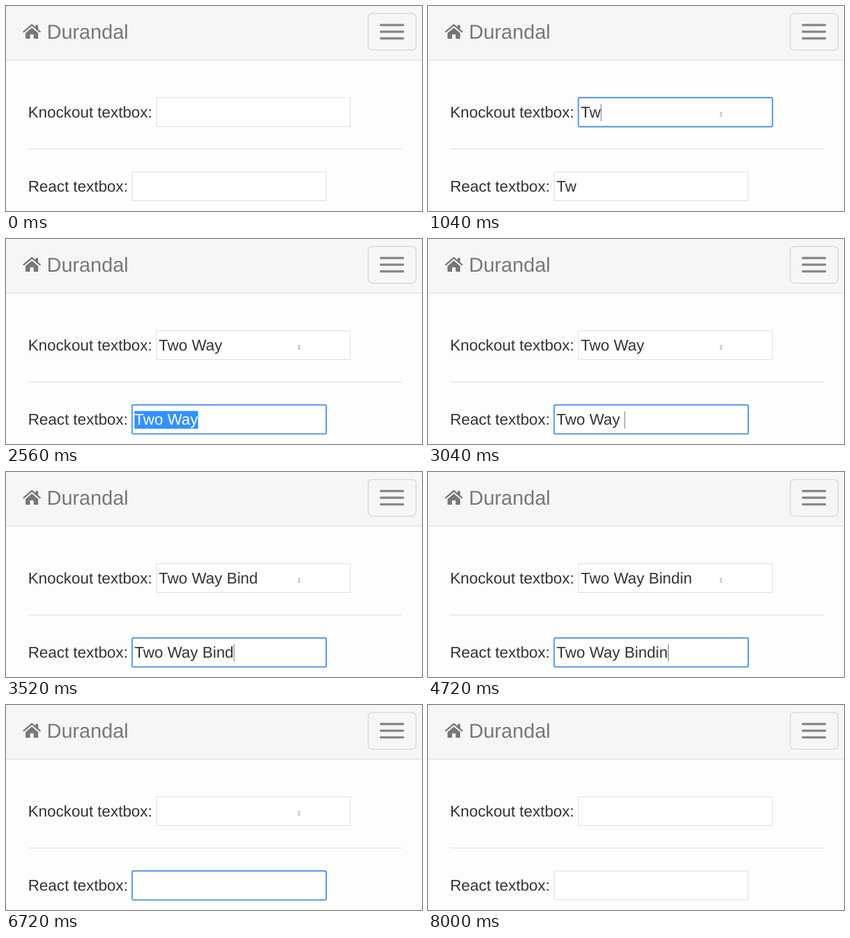
Write an HTML page that moves like this. It is 621 px wide and 307 px high and loops after 8080 ms.

```html
<!DOCTYPE html>
<html lang="en">
<head>
<meta charset="utf-8">
<title>Two-way binding</title>
<style>
  html, body { margin: 0; width: 100%; height: 100%; overflow: hidden; background: #fdfdfd; }
  svg { display: block; width: 100%; height: 100%; }
  text {
    font: 23.3px "Liberation Sans", Arial, sans-serif;
    fill: #333; white-space: pre; text-rendering: geometricPrecision;
  }
  .brand { font-size: 30px; fill: #777; }
</style>
</head>
<body>
<svg id="stage" viewBox="0 0 621 307">
  <rect width="621" height="307" fill="#fdfdfd"/>
  <rect width="621" height="81" fill="#f6f6f6"/>
  <path d="M0 81H621" stroke="#e4e4e4" stroke-width="1.6"/>
  <g fill="#777">
    <path d="M44 28.5h4v8l-4-3.4z"/>
    <path d="M29.2 40.4 38.6 32.5 48 40.4V49h-6.7v-6.6h-5.4V49h-6.7z"/>
    <path d="M25.8 39.2 38.6 28.4 51.4 39.2" fill="none" stroke="#777" stroke-width="2.4"/>
  </g>
  <text class="brand" x="61" y="49">Durandal</text>
  <rect x="540.7" y="11.2" width="71.5" height="55" rx="6.5" fill="none" stroke="#dadada" stroke-width="1.6"/>
  <path d="M559.5 28.5H592.7M559.5 38.5H592.7M559.5 48.5H592.7" stroke="#888" stroke-width="3.3" stroke-linecap="round"/>
  <path d="M33 214.3H591" stroke="#e6e6e6" stroke-width="1.5"/>
  <text x="33" y="167">Knockout textbox:</text>
  <text x="33" y="278.4">React textbox:</text>
</svg>
<script>
const LOOP = 8080, PHRASE = 'Two Way Binding';
const stage = document.getElementById('stage');

// Times of each keystroke, in order
const typed = [960, 1040, 1120, 1200, 1360, 1440, 1600, 2880, 3120, 3280, 3360, 3440, 3600, 3680, 3760];
const erased = [4720, 4800, 4880, 4960, 5040, 5120, 5200, 5280, 5440, 5600, 5680, 5840, 5920, 6000, 6160];
const caretOff = [[2000, 2640], [4160, 4560], [6160, 6320], [6720, 7120], [7520, 8000]];

function add(tag, attrs) {
  const el = document.createElementNS('http://www.w3.org/2000/svg', tag);
  for (const k in attrs) el.setAttribute(k, attrs[k]);
  return stage.appendChild(el);
}
const show = (el, on) => el.setAttribute('visibility', on ? 'visible' : 'hidden');
const within = (t, a, b) => t >= a && t < b;

function makeField(x, y) {
  const left = x + 3.4;
  add('rect', { x, y, width: 289.5, height: 43, fill: '#fff', stroke: '#dcdcdc' });
  const ring = add('rect', {
    x: x - .1, y: y - .1, width: 289.8, height: 43.4, rx: 1.5,
    fill: 'none', stroke: '#4a92e6', 'stroke-width': 1.9
  });
  const mark = add('rect', { x: left, y: y + 9, height: 26.5, fill: '#3390ff' });
  const text = add('text', { x: left, y: y + 29.7 });
  const caret = add('rect', { y: y + 9.2, width: 1.2, height: 26, fill: '#888' });
  return (value, focus, selected, caretOn) => {
    if (text.textContent !== value) text.textContent = value;
    const w = value ? text.getComputedTextLength() : 0;
    mark.setAttribute('width', w);
    caret.setAttribute('x', left + w);
    text.style.fill = selected ? '#fff' : '';
    show(ring, focus);
    show(mark, selected);
    show(caret, focus && caretOn && !selected);
  };
}

const knockout = makeField(224.6, 137.4);
const react = makeField(188.4, 248.6);
const pointer = add('path', {
  d: 'M435.6 159.4h1l.8.6.8-.6h1M437.4 160v4.4M435.6 165h1l.8-.6.8.6h1',
  fill: 'none', stroke: '#777', 'stroke-width': .8
});

function draw(t) {
  const count = list => list.filter(k => k <= t).length;
  const value = PHRASE.slice(0, count(typed) - count(erased));
  const blinkOn = !caretOff.some(([a, b]) => within(t, a, b));
  knockout(value, within(t, 720, 2240), false, blinkOn);
  react(value, within(t, 2240, 8000), within(t, 2240, 2640), blinkOn);
  show(pointer, within(t, 640, 6880));
}

const start = performance.now();
function tick() {
  draw((performance.now() - start) % LOOP);
  requestAnimationFrame(tick);
}
tick();
</script>
</body>
</html>
```
